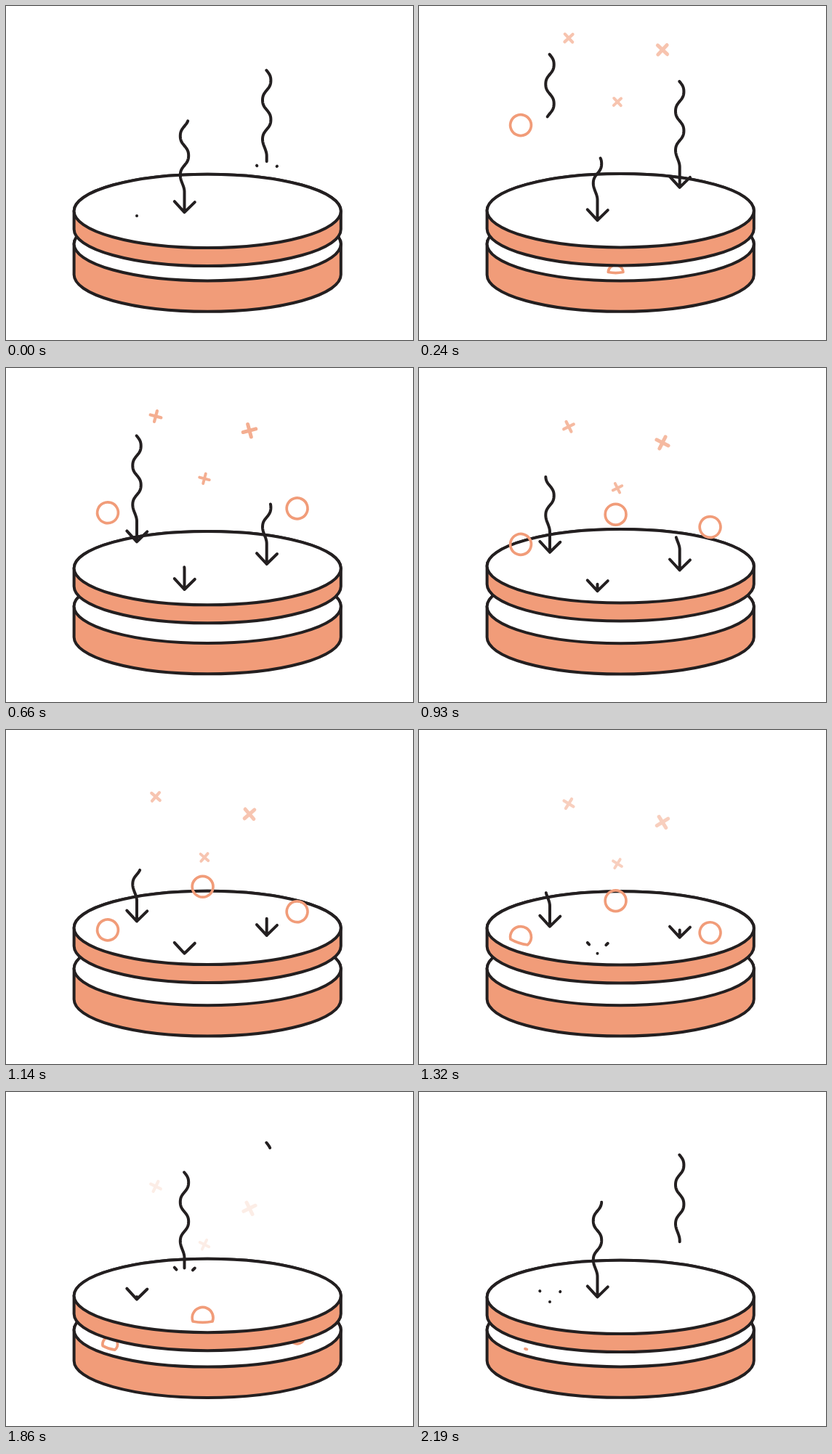
Animation of 560x460 px, one loop 2220 ms. Source, as an HTML page with a canvas:

```html
<!DOCTYPE html>
<html lang="en">
<head>
<meta charset="utf-8">
<title>Layers</title>
<style>
  html, body { margin: 0; width: 100%; height: 100%; overflow: hidden; background: #fff; }
  canvas { display: block; width: 560px; height: 460px; }
</style>
</head>
<body>
<canvas id="stage"></canvas>
<script>
const W = 560, H = 460, LOOP = 2220, STEP = 30;
const INK = '#231f20', PEACH = '#f19c79';
const canvas = document.getElementById('stage');
const ctx = canvas.getContext('2d');
const dpr = window.devicePixelRatio || 1;
canvas.width = W * dpr;
canvas.height = H * dpr;
ctx.scale(dpr, dpr);
ctx.lineCap = ctx.lineJoin = 'round';

/* Timing helpers */
const span = (t, start, length) => Math.min(1, Math.max(0, (t - start) / length));
const mix = (a, b, u) => a + (b - a) * u;
const smooth = u => u * u * (3 - 2 * u);
const smoother = u => u * u * u * (10 - 15 * u + 6 * u * u);
const easeOut = power => u => 1 - (1 - u) ** power;

function bezier(x1, y1, x2, y2) {
  const at = (a, b, s) => 3 * (1 - s) ** 2 * s * a + 3 * (1 - s) * s * s * b + s ** 3;
  return u => {
    let lo = 0, hi = 1;
    for (let i = 0; i < 24; i++) {
      const mid = (lo + hi) / 2;
      if (at(x1, x2, mid) < u) lo = mid; else hi = mid;
    }
    return at(y1, y2, lo);
  };
}

// Time since a part's own start, wrapping round the loop.
const since = (t, start) => ((t - start) % LOOP + LOOP) % LOOP;

function at(x, y, angle, paint) {
  ctx.save();
  ctx.translate(x, y);
  ctx.rotate(angle);
  ctx.beginPath();
  paint();
  ctx.stroke();
  ctx.restore();
}

function pen(color, width) {
  ctx.strokeStyle = color;
  ctx.lineWidth = width;
}

/* Discs */
const CX = 277.2, RX = 183.6, RY = 50.7;

function disc(cy, depth) {
  pen(INK, 4);
  ctx.fillStyle = PEACH;
  ctx.beginPath();
  ctx.ellipse(CX, cy, RX, RY, 0, Math.PI, 2 * Math.PI);
  ctx.ellipse(CX, cy + depth, RX, RY, 0, 0, Math.PI);
  ctx.closePath();
  ctx.fill();
  ctx.stroke();
  ctx.fillStyle = '#fff';
  ctx.beginPath();
  ctx.ellipse(CX, cy, RX, RY, 0, 0, 2 * Math.PI);
  ctx.fill();
  ctx.stroke();
}

/* Arrows: one drawing cycle, each 400 ms after the one before */
const TAIL = -146, FIRST = 1445, LAG = 400;
const grow = easeOut(2);
const shrink = bezier(.12, .1, .5, 1);
const arrows = [
  { x: 245.5, from: 203, to: 307.8, ease: easeOut(3.4) },
  { x: 358.7, from: 215.5, to: 288.5, ease: bezier(.18, .1, .34, 1) },
  { x: 180, from: 197, to: 289, ease: easeOut(1.8) }
];

// Sideways offset of the shaft at height y above the tip.
function wave(y) {
  if (y > -28) return 0;
  if (y > -51) return -2.85 * (1 + Math.cos(Math.PI * (y + 51) / 23));
  const c = Math.cos(Math.PI * (y + 132) / 27);
  return 5.7 * c * (1.25 - .25 * c * c);
}

function arrow({ x, from, to, ease }, i, t) {
  const s = since(t, FIRST + i * LAG);
  const start = mix(TAIL, 0, shrink(span(s, 635, 1400)));
  const end = mix(TAIL, 0, grow(span(s, 0, 600)));
  const head = smooth(span(s, 355, 210)) * (1 - smooth(span(s, 1855, 325)));
  pen(INK, 4);
  at(x, mix(from, to, ease(span(s, 0, 2190))), 0, () => {
    if (start < end) {
      ctx.moveTo(wave(start), start);
      for (let y = start + 1; y < end; y++) ctx.lineTo(wave(y), y);
      ctx.lineTo(wave(end), end);
    }
    if (head > 0) {
      for (const [hx, hy] of [[-13.7, -14.9], [14.3, -14]]) {
        ctx.moveTo(hx, hy);
        ctx.lineTo(hx * (1 - head), hy * (1 - head));
      }
    }
  });
}

/* Crosses */
const crosses = [
  { x: 206, y: 31.5, speed: .053, arm: 7.6, spin: 1 },
  { x: 335, y: 45.5, speed: .0617, arm: 9, spin: -1 },
  { x: 273, y: 120.5, speed: .0482, arm: 7, spin: 1 }
];

function cross({ x, y, speed, arm, spin }, t) {
  const degrees = -6 - 58 * Math.tanh((t - 795) / 360);
  ctx.globalAlpha = Math.min(.82, t / 400, (LOOP - STEP - t) / 1800);
  pen(PEACH, arm * .56);
  at(x, y + speed * t, spin * degrees * Math.PI / 180, () => {
    ctx.moveTo(-arm, 0);
    ctx.lineTo(arm, 0);
    ctx.moveTo(0, -arm);
    ctx.lineTo(0, arm);
  });
  ctx.globalAlpha = 1;
}

/* Rings: sink into the upper disc, come out smaller and sink into the lower */
const FALL = 1200, SINK = 900;
const fall = bezier(.6, .15, .7, 1);
const sink = easeOut(1.7);
const rings = [
  { x: 140, slide: 4, start: 120, tilt: .33, stops: [160, 285, 364], cuts: [292.7, 353] },
  { x: 400.6, slide: 0, start: 380, tilt: -.33, stops: [181, 298, 380], cuts: [297, 352] },
  { x: 270.6, slide: 0, start: 760, tilt: 0, stops: [195.6, 313.6, 385], cuts: [316, 366.5] }
];

function ring({ x, slide, start, tilt, stops, cuts }, level, t) {
  const s = since(t, start);
  const sunk = sink(span(s, FALL, SINK));
  const y = s < FALL ? mix(stops[0], stops[1], fall(s / FALL)) : mix(stops[1], stops[2], sunk);
  if (level === 1 && y < cuts[0]) return;
  const radius = level === 1 ? 10.3 : 14.4 * span(s, 0, 110);
  const angle = Math.atan(tilt);
  const depth = (cuts[level] - y) * Math.cos(angle);
  if (radius <= 0 || depth <= -radius) return;
  pen(PEACH, 3.7);
  at(x + slide * sunk, y, angle, () => {
    if (depth >= radius) {
      ctx.arc(0, 0, radius, 0, 2 * Math.PI);
      return;
    }
    const a = Math.asin(depth / radius), half = radius * Math.cos(a);
    ctx.arc(0, 0, radius, Math.PI - a, 2 * Math.PI + a);
    ctx.quadraticCurveTo(0, depth + half * .2, -half, depth);
    ctx.closePath();
  });
}

function draw(t) {
  const lift = smoother(1 - Math.abs(2 * t / LOOP - 1));
  ctx.fillStyle = '#fff';
  ctx.fillRect(0, 0, W, H);
  disc(327.7 + lift * .8, 42.4);
  rings.forEach(r => ring(r, 1, t));
  disc(282.4 - 10 * lift, 25);
  crosses.forEach(c => t < LOOP - STEP && cross(c, t));
  arrows.forEach((a, i) => arrow(a, i, t));
  rings.forEach(r => ring(r, 0, t));
}

const begin = performance.now();
function tick() {
  const t = (performance.now() - begin) % LOOP;
  draw(Math.floor(t / STEP) * STEP);
  requestAnimationFrame(tick);
}
tick();
</script>
</body>
</html>
```
